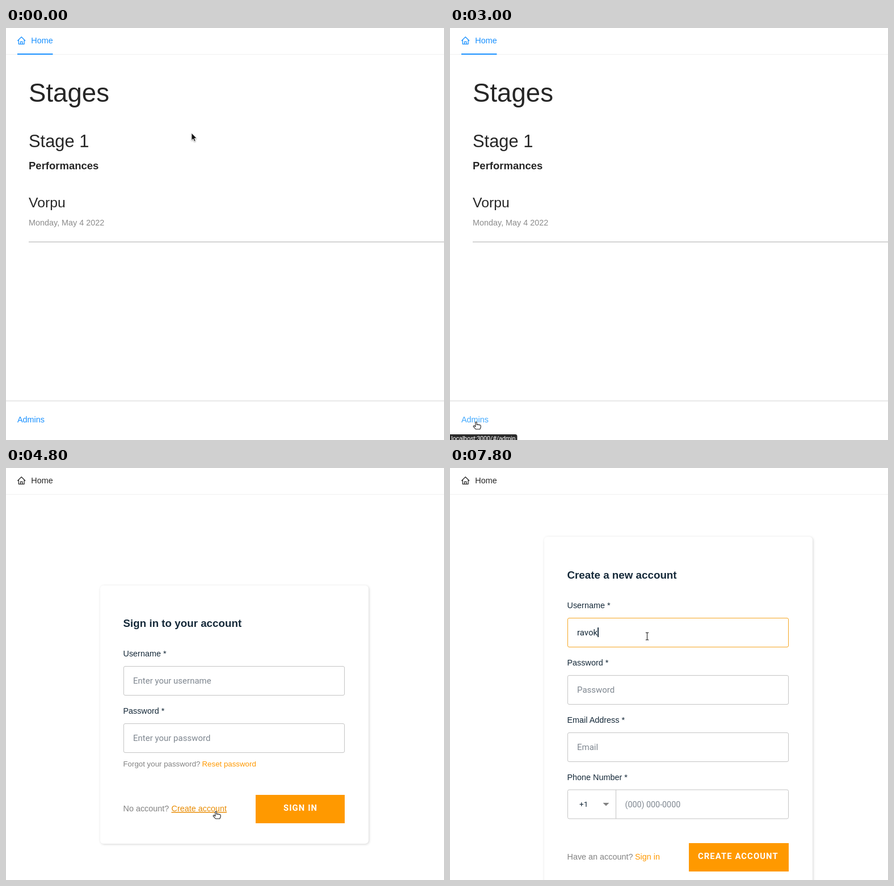
Animation of 772x726 px, one loop 8000 ms. Source, as an HTML page:

```html
<!DOCTYPE html>
<html lang="en">
<head>
<meta charset="utf-8">
<title>Stages</title>
<style>
  html, body { margin: 0; width: 100%; height: 100%; overflow: hidden; background: #fff; }
  svg { display: block; width: 772px; height: 726px; }
  text { font-family: "Liberation Sans", Arial, sans-serif; white-space: pre; }
  .field { font-family: "Fira Sans Condensed", Roboto, sans-serif; }
  .button { font-family: Roboto, sans-serif; font-weight: 700; letter-spacing: 1.1px; }
  .status { font-family: Roboto, sans-serif; letter-spacing: -.25px; }
  .bold { font-weight: 700; }
  .card { fill: #fff; filter: drop-shadow(1px 1px 2px rgba(0, 0, 0, .17)); }
  .box { fill: #fff; stroke: #c4c4c4; }
</style>
</head>
<body>
<svg id="stage" viewBox="0 0 772 726"></svg>
<script>
const LOOP = 8000, STEP = 100;
const BLUE = '#1890ff', INK = '#262626', NAVY = '#152939', GREY = '#828282', ORANGE = '#ff9900';
const USER = 'ravok';

const text = (x, y, size, str, fill, cls = '', id = '') =>
  `<text x="${x}" y="${y}" font-size="${size}" fill="${fill}" class="${cls}" id="${id}">${str}</text>`;
const rect = (x, y, w, h, attrs) => `<rect x="${x}" y="${y}" width="${w}" height="${h}" ${attrs}/>`;
const label = (y, str) => text(206.5, y, 14.4, str + ' *', NAVY);
const input = (y, hint, id = '') =>
  rect(207.5, y + .5, 389, 51, `rx="2.5" class="box" id="${id}"`) +
  text(224, y + 31, 15, hint, '#7f8790', 'field', id && id + 'Text');
const button = (x, y, w, textX, str) =>
  rect(x, y, w, 50, `fill="${ORANGE}"`) + text(textX, y + 28, 14.8, str, '#fff', 'button');

const nav = `
  ${rect(0, 46, 772, 1, 'fill="#f0f0f0"')}
  <g id="home">
    <path fill="none" stroke="currentColor" stroke-width="1.25" stroke-linejoin="round" stroke-linecap="round"
      d="M20.7 22.3L27.2 15.8L33.7 22.3M22.3 21V28.3H32.1V21M25.5 28V24H28.9V28"/>
    ${text(44.3, 27, 14.4, 'Home', 'currentColor')}
  </g>
  ${rect(20, 45, 62.5, 2, `fill="${BLUE}" id="underline"`)}`;

const stages = `
  ${text(40, 130, 45.6, 'Stages', INK)}
  ${text(40, 210, 30.9, 'Stage 1', INK)}
  ${text(40, 249, 18.5, 'Performances', INK, 'bold')}
  ${text(40, 316, 24.8, 'Vorpu', INK)}
  ${text(40, 348, 14.4, 'Monday, May 4 2022', '#8c8c8c')}
  ${rect(40, 376, 732, 2, 'fill="#d4d4d4"')}
  ${rect(0, 656.5, 772, 1.2, 'fill="#d9d9d9"')}
  ${text(20, 695, 14.4, 'Admins', BLUE, '', 'admins')}`;

const signIn = `
  ${rect(166, 207, 473, 455, 'rx="6" class="card"')}
  ${text(206.5, 280, 18.8, 'Sign in to your account', NAVY, 'bold')}
  ${label(332, 'Username')}${input(349, 'Enter your username')}
  ${label(433, 'Password')}${input(450, 'Enter your password')}
  ${text(206.5, 526, 13.3, 'Forgot your password?', GREY)}
  ${text(345.5, 526, 13.3, 'Reset password', ORANGE)}
  ${text(206.5, 605, 14.4, 'No account?', GREY)}
  ${text(291.5, 605, 14.4, 'Create account', ORANGE, '', 'create')}
  ${button(440, 576, 157, 489, 'SIGN IN')}`;

const signUp = `
  ${rect(166, 121, 473, 640, 'rx="6" class="card"')}
  ${text(206.5, 195, 18.8, 'Create a new account', NAVY, 'bold')}
  ${label(247, 'Username')}${input(264, 'Username', 'user')}
  ${label(348, 'Password')}${input(365, 'Password')}
  ${label(448.5, 'Email Address')}${input(466, 'Email')}
  ${label(549.5, 'Phone Number')}${input(566.5, '')}
  <path d="M292.5 567V618" stroke="#c4c4c4"/>
  ${text(228, 597, 13.5, '+1', NAVY, 'field')}
  <path d="M269.5 590H280.5L275 595.5Z" fill="${GREY}"/>
  ${text(308.5, 597.5, 14.3, '(000) 000-0000', '#7f8790', 'field')}
  ${text(206.5, 690, 14.4, 'Have an account?', GREY)}
  ${text(326, 690, 14.4, 'Sign in', ORANGE)}
  ${button(421, 661, 176, 437, 'CREATE ACCOUNT')}
  ${rect(224, 281, 1.8, 17, `fill="${NAVY}" id="caret"`)}`;

const status = `
  <g id="status">
    <path d="M0 716H115Q118.500 716 118.500 719.500V726H0Z" fill="#2b2b2b"/>
    ${text(2, 727, 11, 'localhost:3000/#/admin', '#fff', 'status')}
  </g>`;

const pointers = `
  <g id="pointer">
    <path d="M0 0V13L3 10.400L5 15L7.200 14L5.200 9.600L9 9.300Z" fill="#111" stroke="#fff" stroke-width=".9"
      style="filter:drop-shadow(.5px 1px .8px rgba(0,0,0,.35))"/>
    <path d="M-2.600 -6.300H-.8L0 -5.500L.8 -6.300H2.600M0 -5.500V5.500M-2.600 6.300H-.8L0 5.500L.8 6.300H2.600"
      fill="none" stroke="#333" stroke-width="1.200"/>
    <path d="M-1.200 .8Q0 -.8 1.200 .8V5.200Q2.500 4 3.600 5.300Q5 4.300 6 5.700Q7.800 5 8.200 7V9.500L6.800 13H-.6L-4.800 8.300Q-4.800 6.200 -2.900 7L-1.200 8.600Z"
      fill="#fff" stroke="#222" stroke-width="1.100" stroke-linejoin="round"/>
  </g>`;

const $ = id => document.getElementById(id);
$('stage').innerHTML = `${nav}<g id="stages">${stages}</g><g id="signIn">${signIn}</g>
  <g id="signUp">${signUp}</g>${status}${pointers}`;

// Pointer runs: start time, then x, y, shape for each step (0 arrow, 1 beam, 2 hand).
const runs = [
  [0, '327,185,0 325,192,0 315,199,0 292,190,0 258,160,0 218,118,0 180,76,0 148,47,0 125,35,0 110,49,0'],
  [1000, '107,58,0 100,71,0 91,85,0 83,98,1 76,109,1 71,118,1 69,125,1'],
  [1900, '69,139,1 62,200,1 48,320,1 36,450,0 28,570,0 24,638,0'],
  [2600, '25,646,0 30,661,0 37,676,0 43,688,2 46,694,2'],
  [3300, '46,694,0 46,694,0 53,687,0 71,668,0 101,631,0 143,576,0 188,516,0 228,466,1 257,437,0'],
  [4200, '286,462,1 321,520,1 352,572,0 370,605,2'],
  [4900, '370,605,1'],
  [5200, '378,580,1 379,520,0 383,440,1 369,366,1 354,313,1 347.500,296.500,1']
].map(([start, steps]) => [start, steps.split(' ').map(s => s.split(',').map(Number))]);

function pointerAt(t) {
  const [start, steps] = runs.filter(r => r[0] <= t).pop();
  return steps[Math.min(steps.length - 1, (t - start) / STEP)];
}

const show = (id, on) => $(id).setAttribute('display', on ? 'inline' : 'none');
const fill = (id, color) => $(id).setAttribute('fill', color);

function draw(t) {
  show('stages', t < 3300);
  show('signIn', t >= 3300 && t < 4900);
  show('signUp', t >= 4900);

  const fade = t < 3300 ? 0 : [.1, .55, .87][(t - 3300) / STEP] ?? 1;
  const mix = [24, 144, 255].map(c => Math.round(c + (38 - c) * fade));
  $('home').style.color = `rgb(${mix})`;
  $('underline').setAttribute('opacity', 1 - fade);

  fill('admins', t >= 2900 ? '#40a9ff' : BLUE);
  $('status').setAttribute('opacity', { 2900: .5, 3400: .3 }[t] ?? (t >= 3000 && t < 3400 ? 1 : 0));

  $('create').style.textDecoration = t >= 4500 ? 'underline' : 'none';
  fill('create', t >= 4800 ? '#e88b01' : ORANGE);

  const typed = USER.slice(0, Math.max(0, (t - 7300) / STEP));
  const entry = $('userText');
  entry.textContent = typed || 'Username';
  fill('userText', typed ? NAVY : '#7f8790');
  $('user').style.stroke = t >= 6000 ? '#f5a623' : '';
  show('caret', t >= 6000 && (t < 7200 || typed));
  $('caret').setAttribute('x', 224 + (typed && t >= 4900 ? entry.getComputedTextLength() : 0));

  const [x, y, shape] = pointerAt(t);
  $('pointer').setAttribute('transform', `translate(${x} ${y})`);
  [...$('pointer').children].forEach((el, i) => el.setAttribute('display', i === shape ? 'inline' : 'none'));
}

const began = performance.now();
function tick() {
  const t = (performance.now() - began) % LOOP;
  draw(Math.floor(t / STEP) * STEP);
  requestAnimationFrame(tick);
}
tick();
</script>
</body>
</html>
```
